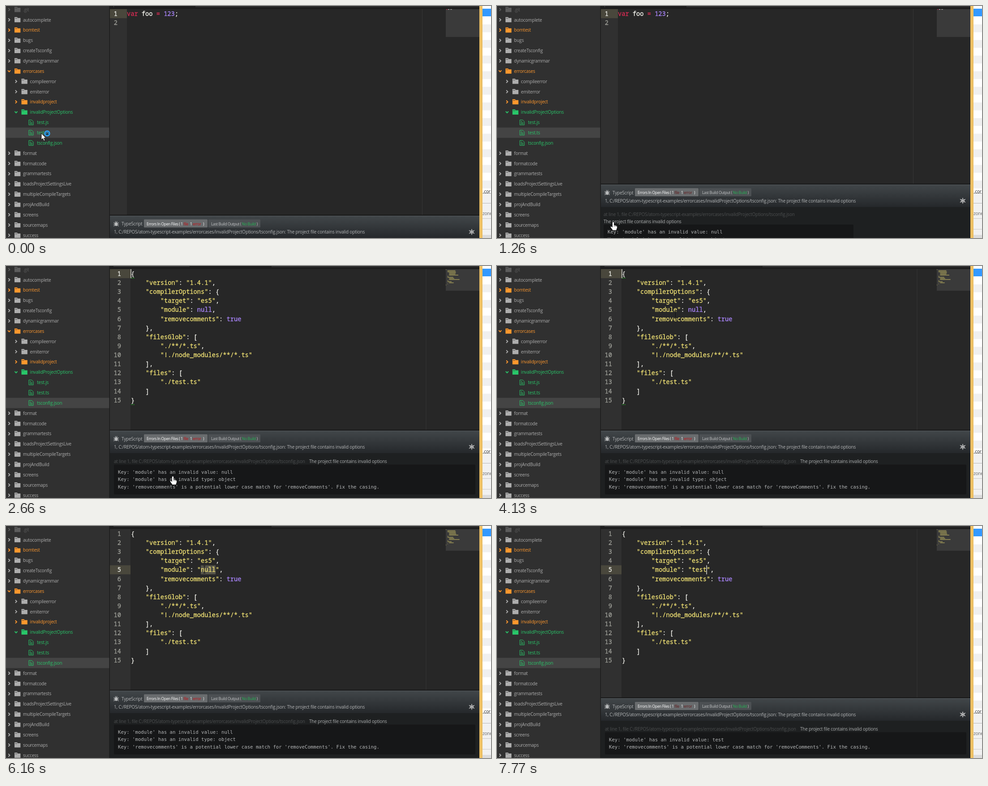
Write an HTML page that moves like this. It is 1083 by 517 pixels and loops after 8000 ms.

```html
<!DOCTYPE html>
<html lang="en">
<head>
<meta charset="utf-8">
<title>Config error panel</title>
<style>
html, body { margin: 0; width: 100%; height: 100%; overflow: hidden; background: #272727; }
svg { display: block; width: 1083px; height: 517px; }
text { white-space: pre; }
.ui { font: 10px "Open Sans", "Noto Sans", sans-serif; letter-spacing: -.2px; }
.tab { font: 8.5px "Open Sans", "Noto Sans", sans-serif; letter-spacing: -.36px; }
.code { font: 13.7px "Noto Sans Mono", "DejaVu Sans Mono", monospace; stroke-width: .3px; }
.pre { font: 10.66px "DejaVu Sans Mono", "Noto Sans Mono", monospace; }
</style>
</head>
<body>
<svg viewBox="0 0 1083 517">
  <defs>
    <linearGradient id="head" x1="0" y1="0" x2="0" y2="1">
      <stop offset="0" stop-color="#42474a"/>
      <stop offset="1" stop-color="#25282b"/>
    </linearGradient>
  </defs>
  <g id="editor"></g>
  <g id="panel"></g>
  <g id="side"></g>
  <g id="back"></g>
  <g id="mouse"></g>
</svg>
<script>
const LOOP = 8000, STEP = 70;
const CHAR = 8.22, LINE = 20.14, ROW = 22.86;
const GRAY = '#aeaeae', ORANGE = '#ff982d', GREEN = '#29c76a';

const esc = s => s.replace(/&/g, '&amp;').replace(/</g, '&lt;');
const rect = (x, y, w, h, fill, extra = '') =>
  `<rect x="${x}" y="${y}" width="${w}" height="${h}" fill="${fill}" ${extra}/>`;
const line = (d, color, width = 1, extra = '') =>
  `<path d="${d}" fill="none" stroke="${color}" stroke-width="${width}" ${extra}/>`;
const shape = (d, fill, extra = '') => `<path d="${d}" fill="${fill}" ${extra}/>`;
const text = (cls, x, y, s, fill, extra = '') =>
  `<text class="${cls}" x="${x}" y="${y}" fill="${fill}" ${extra}>${esc(s)}</text>`;
const ink = color => `fill="${color}" stroke="${color}"`;
const at = (x, y, body) => `<g transform="translate(${x} ${y})">${body}</g>`;

// Only touch the DOM when a layer really differs.
const shown = {};
function put(id, html) {
  if (shown[id] === html) return;
  shown[id] = html;
  document.getElementById(id).innerHTML = html;
}

// ---- file tree: depth, name, colour, open ----
const tree = [
  [0, '.git', '#5c5c5c'], [0, 'autocomplete'], [0, 'bomtest', ORANGE], [0, 'bugs'],
  [0, 'createTsconfig'], [0, 'dynamicgrammar'], [0, 'errorcases', ORANGE, true],
  [1, 'compileerror'], [1, 'emiterror'], [1, 'invalidproject', ORANGE],
  [1, 'invalidProjectOptions', GREEN, true],
  [2, 'test.js', GREEN], [2, 'test.ts', GREEN], [2, 'tsconfig.json', GREEN],
  [0, 'format'], [0, 'formatcode'], [0, 'grammartests'], [0, 'loadsProjectSettingsLive'],
  [0, 'multipleCompileTargets'], [0, 'projAndBuild'], [0, 'screens'], [0, 'sourcemaps'],
  [0, 'success']
];

function treeRow([depth, name, color = GRAY, open], i) {
  const y = 8 + i * ROW;
  const label = text('ui', 38 + depth * 15.6, 3.7, name, color);
  if (depth === 2) {
    const page = line('M51 -5.5H57.5L61 -2V5.5H51ZM53 -2H56M53 .5H59M53 3H59', color);
    return at(0, y, page + label);
  }
  const x = depth * 15.5;
  const arrow = open ? 'M4 -1.7L7 1.5L10 -1.7' : 'M5.3 -3.2L8.5 0L5.3 3.2';
  const folder = 'M19 -6H25L26 -4H32.3V5.5H19Z';
  return at(0, y, at(x, 0, line(arrow, color, 1.9) + shape(folder, color) +
    line('M20 -3.2H25', '#303030', .8)) + label);
}

function sidebar(selected) {
  return rect(0, 0, 231, 517, '#303030') +
    rect(0, 8 + (selected - .5) * ROW, 231, ROW, '#444') +
    tree.map(treeRow).join('') + rect(230.5, 0, 1.5, 517, '#1b1b1b');
}

// ---- window behind, right edge ----
function backdrop() {
  let s = rect(1057, 0, 26, 517, '#fff');
  for (let y = 41; y < 400; y += 34.8) s += rect(1064, y, 19, 17.4, '#f0f0f0');
  s += rect(1064, 6, 19, 17, '#3399ff') + rect(1064, 418, 19, 99, '#f1f1f1') +
    rect(1064, 417, 19, 1, '#999') + rect(1064, 439, 19, 1, '#b5b5b5') +
    rect(1064, 473, 19, 1, '#c8c8c8') + rect(1064, 497, 19, 1, '#c8c8c8') +
    rect(1064, 510, 19, 7, '#dcdcdc') +
    text('ui', 1065, 417, '.cor', '#222', 'font-weight="bold"') +
    text('ui', 1064, 465.5, 'zone', '#666');
  return s + rect(1057, 0, 7, 517, '#edc064');
}

// ---- editor ----
const script = ['var foo = 123;', ''];
const config = value => [
  '{', '    "version": "1.4.1",', '    "compilerOptions": {', '        "target": "es5",',
  `        "module": ${value},`, '        "removecomments": true', '    },',
  '    "filesGlob": [', '        "./**/*.ts",', '        "!./node_modules/**/*.ts"',
  '    ],', '    "files": [', '        "./test.ts"', '    ]', '}'
];

function paint(s) {
  return s.split(/("[^"]*"|\bnull\b|\btrue\b|\b123\b|\bvar\b|=)/).map((part, i) => {
    if (i % 2 === 0) return esc(part);
    const color = part[0] === '"' ? '#f0e174' : /var|=/.test(part) ? '#dd2c55' : '#a985fa';
    return `<tspan ${ink(color)}>${esc(part)}</tspan>`;
  }).join('');
}

function minimap(lines, bottom) {
  const s = rect(982, 7, 75, bottom - 7, '#3a3a3a');
  if (lines.length < 3) return s + rect(983, 7, 3, 1.2, '#b52c4c') +
    rect(987, 7, 3, 1.2, '#ccc') + rect(992, 7, 4, 1.2, '#aaa');
  return s + lines.map((l, i) => {
    const pad = l.search(/\S/);
    return rect(982 + pad * .93, 7.4 + i * 2.45, (l.length - pad) * .93, 1.3, '#b9af60', 'opacity=".9"');
  }).join('');
}

function editor(v) {
  const big = v.lines.length > 2, left = big ? 279 : 270, gutter = big ? 278 : 270;
  const top = i => 7 + i * LINE, col = n => left + n * CHAR;
  let s = rect(231, 0, 826, 517, '#272727') + rect(232, 7, gutter - 232, 510, '#303030') +
    rect(232, top(v.row), gutter - 232, LINE, '#49473c') +
    rect(big ? 937.5 : 929, 7, 1, v.guide - 7, '#363636');
  s += rect(231, 0, 826, 6.5, '#1d1d1d') + (big
    ? rect(240, 0, 170, 2, '#333') + rect(593, 1, 464, 1.2, '#414141')
    : rect(240, 0, 1, 3, '#444') + rect(423, 1, 634, 1.2, '#414141'));
  if (v.select) s += rect(col(v.select), top(4), 4 * CHAR, LINE, '#57554a');
  v.lines.forEach((l, i) => {
    const y = top(i) + 14.8, tone = i === v.row ? '#f2f2ec' : '#a0a19a';
    s += `<text class="code" x="${big ? 257 : 249}" y="${y}" ${ink(tone)} text-anchor="end">${i + 1}</text>` +
      `<text class="code" x="${left}" y="${y}" ${ink('#f8f8f2')}>${paint(l)}</text>`;
  });
  if (v.match) s += [0, 14].map(i =>
    line(`M279 ${top(i) + 20}h8`, '#20c020', 1, 'stroke-dasharray="2 1"')).join('');
  if (v.caret !== null) s += rect(col(v.caret) - .6, top(v.row), 1.3, LINE, '#f8f8f0');
  return s + minimap(v.lines, v.mapEnd);
}

// ---- error panel ----
const PATH = 'C:/REPOS/atom-typescript-examples/errorcases/invalidProjectOptions/tsconfig.json';
const NOTE = 'The project file contains invalid options';
const CASING = "Key: 'removecomments' is a potential lower case match for 'removeComments'. Fix the casing.";
const nullKeys = ["Key: 'module' has an invalid value: null", "Key: 'module' has an invalid type: object", CASING];
const testKeys = ["Key: 'module' has an invalid value: test", CASING];

const bug = shape('M-3 -2Q0 -5 3 -2V3Q0 7 -3 3Z', '#b9bbbc') +
  line('M-5.5 -3L-3 -1M5.5 -3L3 -1M-6 1H6M-5.5 5L-3 3M5.5 5L3 3M-2 -6L-1 -3M2 -6L1 -3', '#b9bbbc', 1.1);
const hub = line('M0 -6.5V6.5M-6 -3.5L6 3.5M6 -3.5L-6 3.5', '#dcdcdc', 1.1) +
  line('M0 -4L3.5 -2V2L0 4L-3.5 2V-2Z', '#dcdcdc', .8);

function header(dim) {
  const red = dim ? '#621a1c' : '#c41016';
  return rect(232, 0, 825, 51, 'url(#head)') + rect(232, -1, 825, 1.6, '#121212') +
    rect(232, 1, 825, 1, '#54595c') + at(246, 19, bug) +
    text('ui', 258, 22.8, 'TypeScript', '#b4b6b7') +
    rect(308, 9, 142, 18, '#696c6e', 'rx="1.5"') + rect(451.5, 9, 116.5, 18, '#4c5053', 'rx="1.5"') +
    text('tab', 314, 22, 'Errors In Open Files ( 1', '#fff') +
    text('tab', 396.5, 22, 'file', red, 'font-weight="bold"') + text('tab', 411, 22, '1', '#fff') +
    text('tab', 417, 22, 'error', red, 'font-weight="bold"') + text('tab', 440, 22, ')', '#fff') +
    `<text class="tab" x="458" y="22" fill="#c4c6c7">Last Build Output ( <tspan fill="#25b455">No Build</tspan> )</text>` +
    text('ui', 241, 40.8, `1, ${PATH}: ${NOTE}`, '#b4b6b7') + at(1040, 37, hub);
}

// pad is the inner margin; it grows with the panel while sliding open.
function panel({ top, pad, keys, dim }) {
  const sliding = pad < 9, x = 232 + pad;
  const boxTop = sliding ? 84 + pad : 76.5;
  const height = sliding ? 80 : 509 - top - boxTop;
  const body = rect(232, 50, 825, 517 - top, '#1e2021') +
    text('ui', x, (sliding ? 61 + pad : 69.5) + 3.6, `at line 1, file ${PATH}`, '#4c4e4f') +
    text('ui', sliding ? x : 677, sliding ? 80.6 + pad : 73.1, NOTE, '#acaeaf') +
    rect(x, boxTop, sliding ? 558 : 807, height, '#161718', 'rx="2"') +
    keys.map((k, i) => text('pre', x + 9, boxTop + 20.3 + i * 16.5, k, '#b4b6b7')).join('');
  return at(0, top, body + header(dim));
}

// ---- pointer ----
const route = [
  [140, 79, 284], [560, 257, 440], [630, 257, 440], [840, 252, 486], [910, 250, 497],
  [1050, 259.5, 481], [2100, 259.5, 481], [2380, 372.5, 468.5], [3220, 372.5, 468.5],
  [3500, 700, 390], [3640, 925, 280], [3850, 575, 118], [4060, 391, 110], [4550, 443, 97]
];
const arrow = shape('M0 0V14L3.3 11L5.6 16.5L8 15.5L5.7 10.2H10Z', '#fff', 'stroke="#000" stroke-width=".8"');
const hand = shape('M-2 1Q0 -1 2 1V7L7.5 8.5Q9.5 9.5 9 13L7 19H-1L-6 12Q-6 9 -3.5 10.5L-2 12Z', '#fff',
  'stroke="#111" stroke-width=".8"') + line('M2 7V11M4.7 8V11M7 9V11', '#333', .7);
const beam = line('M-2.5 -8H2.5M0 -8V8M-2.5 8H2.5', '#101010', 1.1);
const busy = '<circle r="5.2" fill="#16384f" stroke="#2d9fee" stroke-width="3"/>' +
  line('M-2 1A2.3 2.3 0 1 1 2 1', '#8fcdf6', 1);

function place(t) {
  const q = Math.floor(t / STEP + 1e-6) * STEP;
  const i = route.findIndex(p => p[0] > q);
  if (i < 0) return route[route.length - 1].slice(1);
  if (i === 0) return route[0].slice(1);
  const [t0, x0, y0] = route[i - 1], [t1, x1, y1] = route[i];
  const k = (q - t0) / (t1 - t0);
  return [x0 + (x1 - x0) * k, y0 + (y1 - y0) * k];
}

function pointer(t, top) {
  if (t >= 6790) return '';
  const [x, y] = place(t);
  const kind = y > top ? hand : x < 270 ? arrow : beam;
  return (t < 210 ? at(92, 284, busy) : '') + at(x, y, kind);
}

// ---- timeline: the last entry that has started wins ----
const pick = (t, steps) => steps.filter(s => s[0] <= t).pop()[1];
const tops = [[0, 466.5], [1190, 436], [1260, 397], [1330, 366], [7490, 383]];
const pads = [[0, 0], [1190, 3], [1260, 6], [1330, 9]];
const values = [[0, 'null'], [6160, '"null"'], [6790, '"t"'], [6860, '"te"'], [6930, '"test"']];
const carets = [
  [0, null], [350, 0], [770, null], [2660, 0], [2940, null], [3360, 0], [3780, null], [4130, 0],
  [4550, null], [4760, 20], [4900, null], [6790, 20], [6860, 21], [6930, 23], [7420, null], [7770, 23]
];
const selections = [[0, 0], [4900, 18], [6160, 19], [6790, 0]];
const mapEnds = [[0, 69], [1330, 59], [2660, 55]];
const guides = [[0, 517], [1330, 366], [7630, 383]];

function draw(t) {
  const loaded = t >= 2660, top = pick(t, tops);
  put('editor', editor({
    lines: loaded ? config(pick(t, values)) : script,
    row: t >= 4760 ? 4 : 0,
    match: loaded && t < 4760,
    caret: pick(t, carets),
    select: pick(t, selections),
    mapEnd: pick(t, mapEnds),
    guide: pick(t, guides)
  }));
  put('panel', panel({
    top,
    pad: pick(t, pads),
    keys: t >= 7490 ? testKeys : nullKeys,
    dim: t >= 7490 || (t >= 1190 && t < 1330)
  }));
  put('side', sidebar(loaded ? 13 : 12));
  put('mouse', pointer(t, top));
}

put('back', backdrop());
const start = performance.now();
function tick() {
  draw((performance.now() - start) % LOOP);
  requestAnimationFrame(tick);
}
tick();
</script>
</body>
</html>
```
